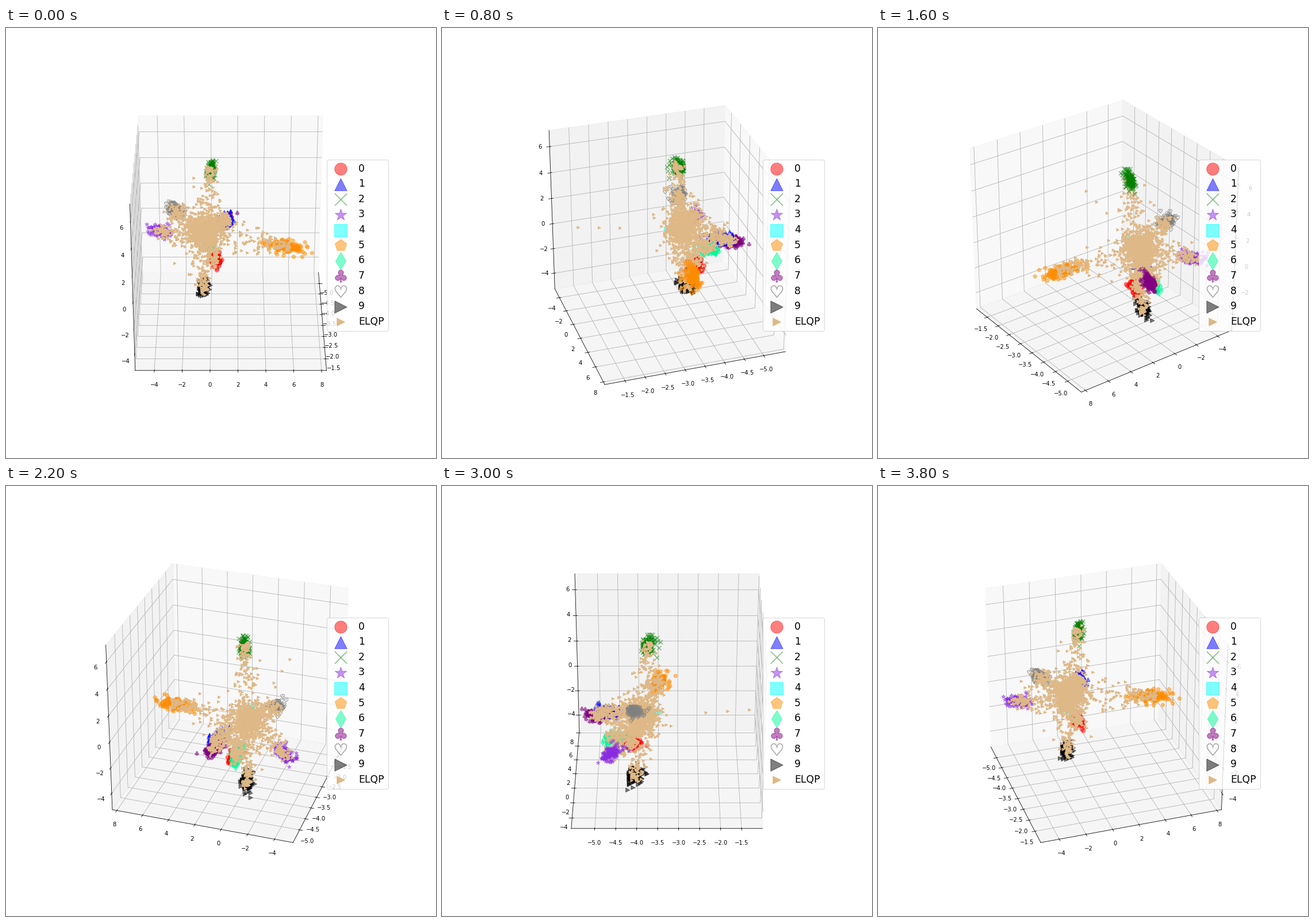
A matplotlib script for the animation above (4000 ms loop, 748 by 748 pixels).

```python
import numpy as np
import matplotlib.pyplot as plt
from matplotlib.animation import FuncAnimation

SIZE, DPI = 748, 72
FRAMES, INTERVAL = 20, 200
LOW = np.array([-5.56, -5.37, -5.295])
HIGH = np.array([-1.0, 8.355, 7.229])
MID, SPAN = (LOW + HIGH) / 2, (HIGH - LOW) * 24 / 25

# every class sits at the tip of a ray leaving the hub (unit cube coordinates)
HUB = np.array([-0.14, -0.15, -0.03])
STRAY = np.array([0.45, -0.21, 0.05])
CLASSES = [
    ("o", "red", (-0.20, -0.09, -0.235)),
    ("^", "blue", (-0.34, -0.03, -0.06)),
    ("x", "green", (-0.10, -0.11, 0.39)),
    ("*", "blueviolet", (-0.30, -0.40, -0.11)),
    ("s", "cyan", (-0.13, -0.13, -0.015)),
    ("p", "darkorange", (-0.05, 0.31, -0.065)),
    ("d", "mediumspringgreen", (-0.295, -0.13, -0.18)),
    (r"$\clubsuit$", "purple", (-0.39, -0.03, -0.09)),
    (r"$\heartsuit$", "gray", (-0.175, -0.31, 0.095)),
    (">", "black", (-0.18, -0.155, -0.415)),
]

rng = np.random.default_rng(4)


def cluster(tip, n=140):
    """Cloud drawn out along its ray, with a tail towards +x."""
    along = np.clip(rng.normal(size=(n, 1)), -2.2, 2.2)
    cloud = tip + along * (tip - HUB) * (0.12, 0.12, 0.06)
    cloud += rng.normal(size=(n, 3)) * (0, 0.013, 0.015)
    cloud[:, 0] += rng.gumbel(-0.01, 0.017, n)
    return cloud


def arm(tip, n=130):
    """Points strewn from hub to tip, tightening towards the tip."""
    t = 1.05 * rng.beta(1.2, 0.7, (n, 1))
    width = 0.015 + 0.055 * np.clip(1 - t, 0, 1)
    return HUB + t * (tip - HUB) + rng.normal(size=(n, 3)) * width


fig = plt.figure(figsize=(SIZE / DPI, SIZE / DPI), dpi=DPI)
ax = fig.add_subplot(projection="3d")
ax.apply_aspect = lambda position=None: None  # keep the full subplot area
ax.set_box_aspect((1, 1, 1), zoom=np.sqrt(3) / 1.8294640721620434)


def plot(cloud, marker, color, label, size=50, alpha=0.5):
    ax.scatter(*(MID + SPAN * cloud).T, s=size, c=color, marker=marker,
               alpha=alpha, label=label)


tips = [np.array(tip) for _, _, tip in CLASSES]
for k, (marker, color, _) in enumerate(CLASSES):
    plot(cluster(tips[k]), marker, color, str(k))

core = HUB + rng.normal(size=(450, 3)) * 0.042
strays = HUB + np.linspace(0.6, 1, 3)[:, None] * (STRAY - HUB)
plot(np.vstack([core, strays, *map(arm, tips)]), ">", "burlywood", "ELQP",
     size=20, alpha=1)

ax.set(xlim=(LOW[0], HIGH[0]), ylim=(LOW[1], HIGH[1]), zlim=(LOW[2], HIGH[2]),
       xticks=np.arange(-5, -1, 0.5), yticks=np.arange(-4, 9, 2),
       zticks=np.arange(-4, 7, 2))
ax.tick_params(pad=5)
ax.legend(loc="center right", fontsize="xx-large", markerscale=3).set_zorder(20)


def turn(i):
    # the tiny offset settles which side wall shows in edge-on views
    ax.view_init(elev=30, azim=i * 360 / FRAMES + 1e-3 * (5 - i))
    return ()


anim = FuncAnimation(fig, turn, frames=FRAMES, interval=INTERVAL,
                     init_func=lambda: turn(0), repeat=True, repeat_delay=0)
plt.show()
```
